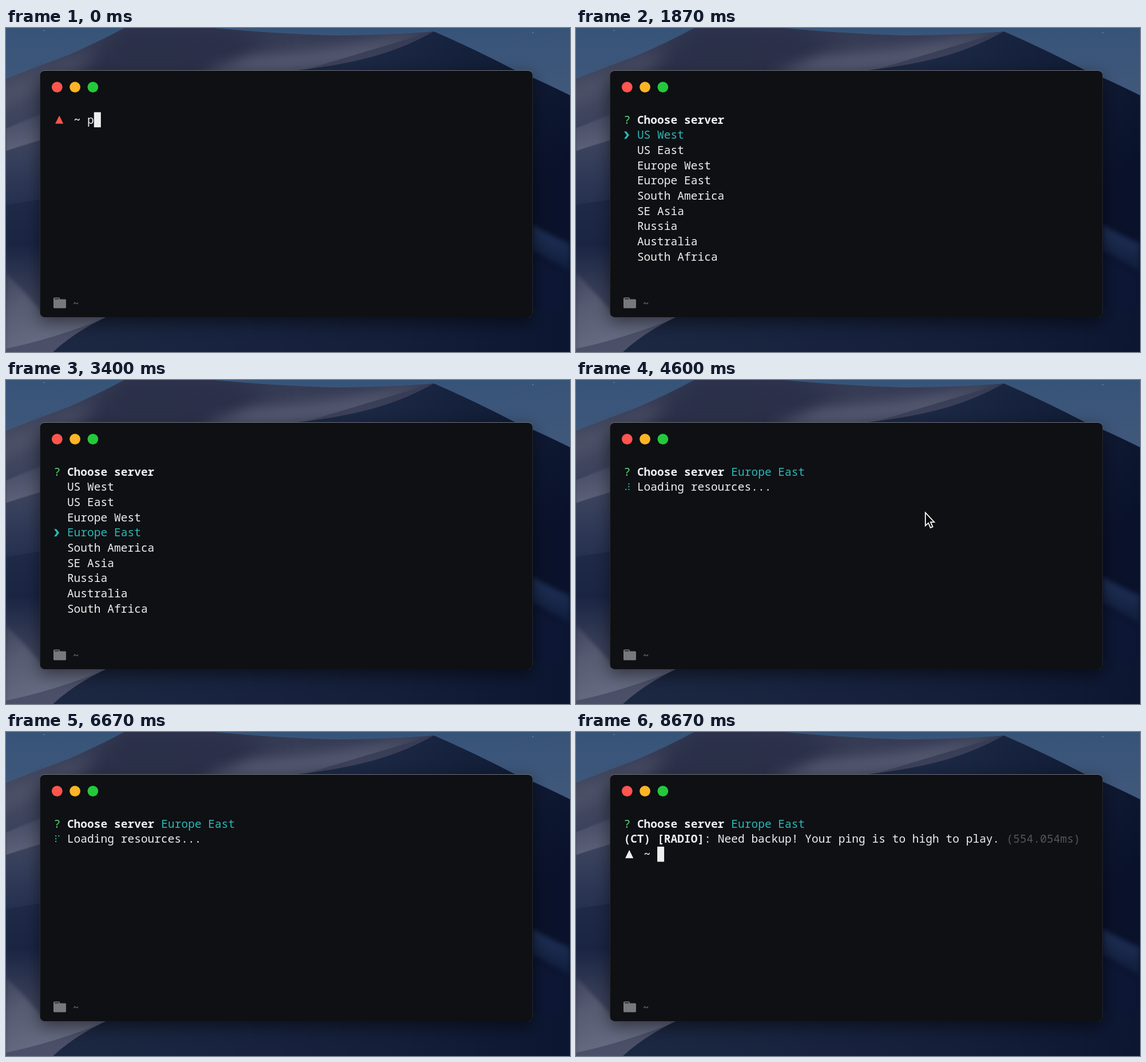
An HTML page with a canvas for the animation above (8.74 s loop, 986x568 px).

```html
<!DOCTYPE html>
<html lang="en">
<head>
<meta charset="utf-8">
<title>Terminal session</title>
<style>
  html, body { margin: 0; width: 100%; height: 100%; overflow: hidden; background: #10182e; }
  canvas { display: block; }
</style>
</head>
<body>
<canvas id="stage" width="986" height="568"></canvas>
<script>
const W = 986, H = 568, LOOP = 8740, TICK = 200 / 3;
const stage = document.getElementById('stage').getContext('2d');

const FONT = '"Noto Sans Mono", "DejaVu Sans Mono", monospace';
const SIZE = 19.56, COL = 11.74, ROW = 26.67, LEFT = 83.4, BASE = 167.8;
const WHITE = '#eeeff0', CYAN = '#2cb8b8', GREEN = '#5ad877', RED = '#fb544d', DIM = '#545558';

const COMMAND = 'pinggo';
const KEY_TIMES = [0, 200, 330, 470, 670, 800];
const SERVERS = ['US West', 'US East', 'Europe West', 'Europe East', 'South America',
  'SE Asia', 'Russia', 'Australia', 'South Africa'];
const MENU_AT = 1530, DOWN_TIMES = [2130, 2530, 3000], LOAD_AT = 3415, DONE_AT = 7930;
const POINTER_FROM = 4330, POINTER_TO = 4665;
const SPINNER = '⠋⠙⠹⠸⠼⠴⠦⠧⠇⠏', SPIN_MS = 82.5;

const passed = (times, t) => times.filter(at => t >= at).length;

function gradient(c, x0, y0, x1, y1, ...colors) {
  const g = c.createLinearGradient(x0, y0, x1, y1);
  colors.forEach((color, i) => g.addColorStop(i / (colors.length - 1), color));
  return g;
}

function shape(c, path, fill, blur = 0) {
  c.save();
  if (blur) c.filter = `blur(${blur}px)`;
  c.fillStyle = fill;
  c.fill(new Path2D(path));
  c.restore();
}

function drawDunes(c) {
  c.fillStyle = gradient(c, 0, 0, 0, 120, '#375478', '#40587c');
  c.fillRect(0, 0, W, H);
  c.fillStyle = '#8299b5';
  c.fillRect(66, 4, 2, 1);
  c.fillRect(920, 8, 2, 1);

  // Large dune on the left, with its lit slope running to the summit
  shape(c, 'M0 89 Q60 66 110 47 Q160 25 207 0 L362 0 Q470 10 570 13 Q670 13 748 6 L748 568 L0 568Z',
    gradient(c, 0, 0, 0, H, '#343a53', '#41465d', '#3b435d', '#202b48', '#1a2543', '#3b415a', '#555a70'));
  c.save();
  c.clip(new Path2D('M0 89 Q60 66 110 47 Q160 25 207 0 L362 0 Q470 10 570 13 Q670 13 748 6 L500 80 L0 260Z'));
  shape(c, 'M205 -10 L390 -5 L470 30 L330 90 L110 90Z', '#2b3049', 18);
  shape(c, 'M430 50 Q570 42 740 4 L620 60 L480 82 L340 85Z', '#53586f', 11);
  shape(c, 'M-20 105 L70 70 L160 45 L100 90 L-20 150Z', '#4b5067', 12);
  c.restore();

  // Shaded face and right-hand ridge
  shape(c, 'M748 6 Q690 39 622 55 Q560 70 480 77 L480 568 L986 568 L986 118 Q930 90 888 73 Q815 35 748 6Z',
    gradient(c, 650, 20, 900, 300, '#1c2945', '#111c36', '#0a122b'));
  shape(c, 'M920 345 Q950 363 986 378 L986 430 L920 390Z', gradient(c, 940, 350, 920, 420, '#1d3156', '#101b39'), 4);
  shape(c, 'M920 395 L986 430 L986 568 L920 568Z', '#0d1735', 8);

  // Folds along the left edge
  shape(c, 'M0 216 Q30 206 64 196 L64 150 L0 176Z', gradient(c, 0, 150, 10, 214, '#444a63', '#5c6178'), 1);
  shape(c, 'M0 216 Q30 206 64 196 L64 300 L0 310Z', gradient(c, 0, 205, 0, 305, '#3b435e', '#263150'));

  // Foreground
  shape(c, 'M0 430 Q40 470 64 500 L190 500 L180 507 Q125 532 82 568 L0 568Z',
    gradient(c, 0, 420, 60, 540, '#3a405a', '#565b72', '#646980'), 3);
  shape(c, 'M0 562 Q80 546 178 507 Q125 532 82 568 L0 568Z', '#4b5068');
  shape(c, 'M200 496 Q130 524 82 568 L986 568 L986 490Z',
    gradient(c, 82, 0, W, 0, '#1c2742', '#18233f', '#141e39', '#0c1631'));
}

function drawWindow(c) {
  const x = 59.5, y = 74, w = 861, h = 433;
  c.save();
  c.shadowColor = 'rgba(0,0,0,.5)';
  c.shadowBlur = 30;
  c.shadowOffsetY = 10;
  c.fillStyle = '#6c7079';
  c.beginPath();
  c.roundRect(x, y, w, h, 8);
  c.fill();
  c.restore();

  c.fillStyle = '#0e1013';
  c.beginPath();
  c.roundRect(x, y + 1, w, h - 1, 8);
  c.fill();
  c.fillStyle = '#101114';
  c.fillRect(x, 460, w, 1);

  ['#fe554e', '#fdb426', '#23c93b'].forEach((color, i) => {
    c.fillStyle = color;
    c.beginPath();
    c.arc(89.3 + i * 31.3, 103.6, 9.4, 0, Math.PI * 2);
    c.fill();
  });

  c.fillStyle = '#77787b';
  c.beginPath();
  c.roundRect(83, 472.5, 11, 6, 1.5);
  c.roundRect(83, 475.5, 22, 15.8, 1.5);
  c.fill();
  c.fillStyle = '#0e1013';
  c.fillRect(85, 474.2, 7.5, 1.3);
  c.fillStyle = '#77787b';
  c.font = `18px ${FONT}`;
  c.fillText('~', 116.7, 488.5);
}

function write(str, col, row, color = WHITE, weight = 400) {
  stage.font = `${weight} ${SIZE}px ${FONT}`;
  stage.fillStyle = color;
  stage.fillText(str, LEFT + col * COL, BASE + row * ROW);
}

function drawCaret(col, row) {
  stage.fillStyle = WHITE;
  stage.fillRect(LEFT + col * COL, 147.6 + row * ROW, 12, 26.5);
}

function drawPrompt(row, color) {
  const y = row * ROW;
  shape(stage, `M93.2 ${153.5 + y} L100.3 ${167.8 + y} L86.1 ${167.8 + y}Z`, color);
  write('~', 3, row, WHITE, 700);
}

function drawQuestion(answer) {
  write('?', 0, 0, GREEN);
  write('Choose server', 2, 0, WHITE, 700);
  if (answer) write(answer, 16, 0, CYAN);
}

function drawMenu(selected) {
  drawQuestion();
  SERVERS.forEach((name, i) => write(name, 2, i + 1, i === selected ? CYAN : WHITE));
  const y = 161 + (selected + 1) * ROW;
  shape(stage, `M84 ${y - 6.5} h4 l5 6.5 l-5 6.5 h-4 l4.6 -6.5Z`, CYAN);
}

// Braille bits 0-2 are the left column, 3-5 the right one
function drawSpinner(t) {
  const step = Math.floor((t - LOAD_AT) / SPIN_MS) % SPINNER.length;
  const bits = SPINNER.charCodeAt(step) - 0x2800;
  stage.fillStyle = CYAN;
  for (let i = 0; i < 6; i++) {
    if (bits >> i & 1) stage.fillRect(86.1 + (i > 2 ? 5.2 : 0), 181.2 + (i % 3) * 4.8, 2.1, 2.1);
  }
}

function drawPointer() {
  const arrow = new Path2D('M610.8 232.5 V255.5 L616 250.7 L619.8 259 L623.6 257.3 L619.9 249.2 H626.3Z');
  stage.fillStyle = '#08090b';
  stage.fill(arrow);
  stage.strokeStyle = '#fff';
  stage.lineWidth = 1.8;
  stage.stroke(arrow);
}

function drawResult() {
  drawQuestion('Europe East');
  write('(CT) [RADIO]', 0, 1, WHITE, 700);
  write(': Need backup! Your ping is to high to play.', 12, 1);
  write('(554.054ms)', 57, 1, DIM);
  drawPrompt(2, WHITE);
  drawCaret(5, 2);
}

function drawScreen(t) {
  if (t < MENU_AT) {
    const typed = COMMAND.slice(0, passed(KEY_TIMES, t));
    drawPrompt(0, RED);
    write(typed, 5, 0);
    drawCaret(5 + typed.length, 0);
  } else if (t < LOAD_AT) {
    drawMenu(passed(DOWN_TIMES, t));
  } else if (t < DONE_AT) {
    drawQuestion('Europe East');
    drawSpinner(t);
    write('Loading resources...', 2, 1);
    if (t >= POINTER_FROM && t < POINTER_TO) drawPointer();
  } else {
    drawResult();
  }
}

const backdrop = document.createElement('canvas');
backdrop.width = W;
backdrop.height = H;
const back = backdrop.getContext('2d');
drawDunes(back);
drawWindow(back);

const start = performance.now();
function render() {
  const t = (performance.now() - start) % LOOP;
  stage.drawImage(backdrop, 0, 0);
  drawScreen(Math.floor((t + 4) / TICK) * TICK);
  requestAnimationFrame(render);
}
render();
</script>
</body>
</html>
```
